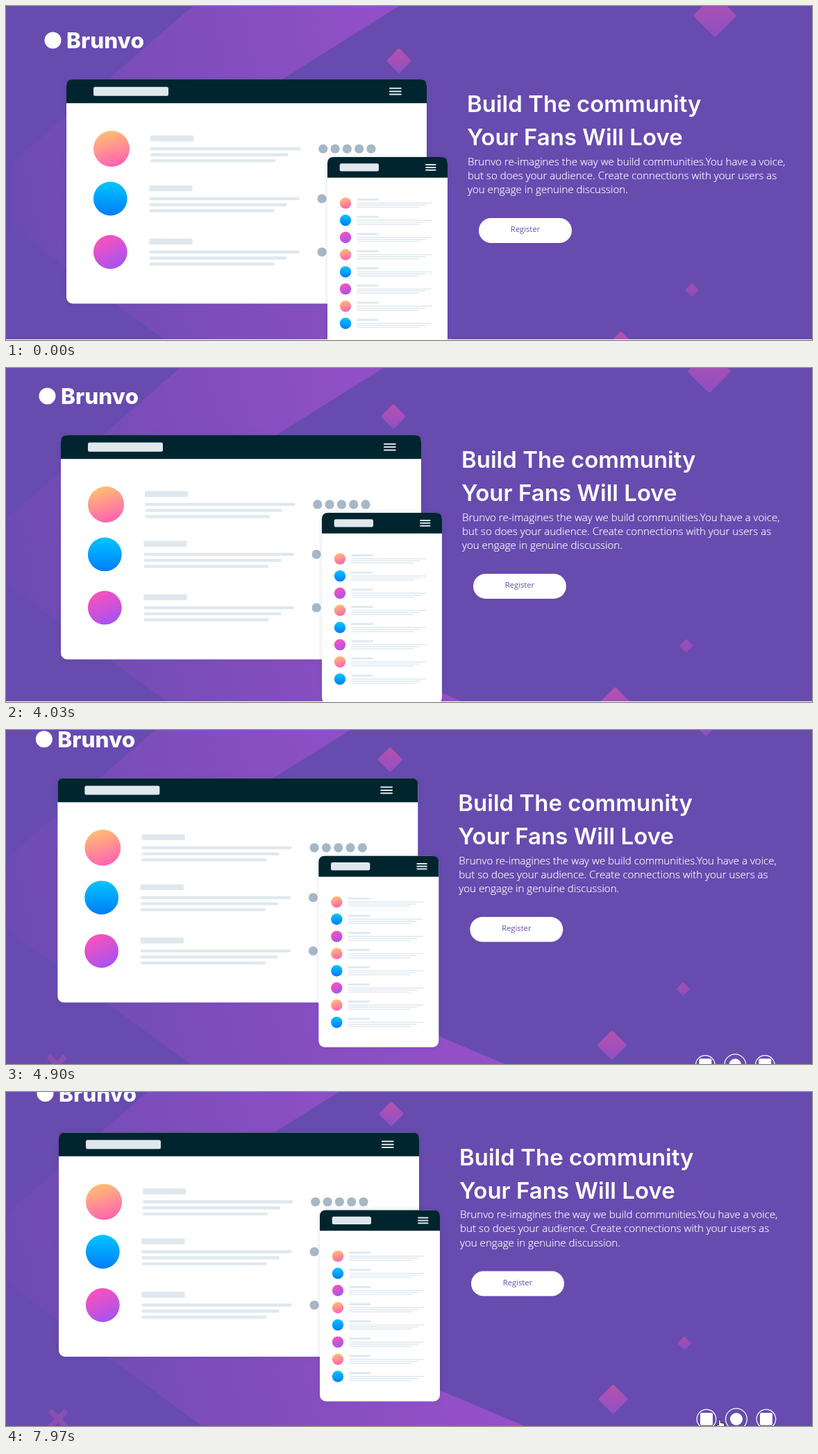
These frames come from a looping animation (1161x482 px, 8 s). An HTML page:

```html
<!DOCTYPE html>
<html lang="en">
<head>
<meta charset="utf-8">
<title>Brunvo</title>
<style>
  html, body { margin: 0; width: 100%; height: 100%; overflow: hidden; background: #674baf; }
  svg { display: block; width: 100%; height: 100%; }
  .brand, .title { font-family: Inter, "Open Sans", sans-serif; font-optical-sizing: none; fill: #fff; }
  .brand { font-size: 31.5px; font-weight: 800; }
  .title { font-size: 33px; font-weight: 640; }
  .copy { font: 300 15.1px "Open Sans", sans-serif; fill: #fff; stroke: #fff; stroke-width: .2; }
  .label { font: 400 11.2px "Open Sans", sans-serif; text-anchor: middle; }
  .card { filter: drop-shadow(0 0 3px rgba(40, 60, 110, .16)); }
</style>
</head>
<body>
<svg viewBox="0 0 1161 482" preserveAspectRatio="none">
  <defs>
    <linearGradient id="band" gradientUnits="userSpaceOnUse" x1="-46" y1="300" x2="684" y2="132">
      <stop stop-color="#684baf"/><stop offset="1" stop-color="#9a50cc"/>
    </linearGradient>
    <linearGradient id="gem" x1="0" y1="0" x2="1" y2="1">
      <stop stop-color="#c152ab"/><stop offset="1" stop-color="#9450c8"/>
    </linearGradient>
    <linearGradient id="peach" x1=".35" y1="0" x2=".65" y2="1">
      <stop stop-color="#ffc070"/><stop offset="1" stop-color="#ff60b4"/>
    </linearGradient>
    <linearGradient id="sky" x1="0" y1="0" x2="0" y2="1">
      <stop stop-color="#00c6ff"/><stop offset="1" stop-color="#007cfa"/>
    </linearGradient>
    <linearGradient id="orchid" x1=".25" y1="0" x2=".75" y2="1">
      <stop stop-color="#ff52b8"/><stop offset="1" stop-color="#a153f4"/>
    </linearGradient>
  </defs>
  <g id="page">
    <path fill="url(#band)" d="M10 225L269 0H566L300 167 400 378 636 478 759 530H294L158 430 10 321Z"/>
    <g id="gems"></g>
    <path d="M74 507l24 24m0-24l-24 24" stroke="#b052b4" stroke-opacity=".5" stroke-width="8"/>
    <circle cx="67.5" cy="49.5" r="12" fill="#fff"/>
    <text class="brand" x="87" y="61">Brunvo</text>
    <g id="desktop" class="card"></g>
    <g id="phone" class="card"></g>
    <text class="title" x="664" y="153">Build The community</text>
    <text class="title" x="664" y="201">Your Fans Will Love</text>
    <text class="copy" x="665" y="229.7">Brunvo re-imagines the way we build communities.You have a voice,</text>
    <text class="copy" x="665" y="249.9">but so does your audience. Create connections with your users as</text>
    <text class="copy" x="665" y="270.2">you engage in genuine discussion.</text>
    <rect id="button" x="681" y="306" width="134" height="36" rx="18"/>
    <text id="label" class="label" x="748" y="326">Register</text>
    <g id="social"></g>
  </g>
  <rect id="edge" y="481" width="1161" height="1" fill="#fff"/>
  <g id="cursor" stroke="#111" stroke-width=".8" stroke-linejoin="round" fill="#fff">
    <path id="arrow" d="M0 0V11.5L2.7 9 4.5 13 6.3 12.2 4.5 8.3H8Z"/>
    <path id="hand" d="M-1.3 .6Q0 -.8 1.2 .6V4.2L5.5 5.2Q7 5.6 6.8 7.5L5.8 13H-.6L-3.8 8.4Q-4.2 6.6-2.6 7L-1.3 8.3Z"/>
  </g>
</svg>
<script>
const LOOP = 8000, HOVER = '#e882e8', PALE = '#e0e8ee', DARK = '#00252e', VIOLET = '#674baf';
const avatars = ['peach', 'sky', 'orchid'];
const $ = id => document.getElementById(id);
const clamp = k => Math.min(1, Math.max(0, k));

function add(parent, tag, attrs) {
  const el = document.createElementNS('http://www.w3.org/2000/svg', tag);
  for (const k in attrs) el.setAttribute(k, attrs[k]);
  parent.append(el);
  return el;
}
const rect = (g, x, y, width, height, fill, rx = 0) => add(g, 'rect', { x, y, width, height, fill, rx });
const dot = (g, cx, cy, r, fill) => add(g, 'circle', { cx, cy, r, fill });

function gem(x, y, r, opacity) {
  const s = r * Math.SQRT2;
  const el = rect($('gems'), -s / 2, -s / 2, s, s, 'url(#gem)', r / 10);
  el.setAttribute('transform', `translate(${x} ${y}) rotate(45)`);
  el.setAttribute('opacity', opacity);
}

// White window with a dark header, a search bar and a menu icon
function card(g, x, y, w, h, head, pad, bar) {
  const mid = y + head / 2, menu = head * .52;
  rect(g, x, y, w, h, '#fff', 9);
  add(g, 'path', {
    d: `M${x} ${y + head}v${9 - head}q0-9 9-9h${w - 18}q9 0 9 9v${head - 9}Z`, fill: DARK
  });
  rect(g, x + pad, mid - head * .19, bar, head * .38, PALE, 2.5);
  for (let i = -1; i < 2; i++) rect(g, x + w - pad * .93 - menu, mid - 1 + i * head * .127, menu, 2, PALE, 1);
}

// Heading bar plus three text lines, each shorter than the last
function post(g, x, y, w, h) {
  rect(g, x, y - h * 4.5, w * .288, h * 2, PALE, h / 3);
  for (let i = 0; i < 3; i++) rect(g, x, y + h * (i * 2.03 - .5), w * (1 - i / 12), h, PALE, h / 2);
}

function build() {
  gem(1021, 14, 31.5, .85);
  gem(566, 79, 18.3, .9);
  gem(988, 410, 10, .7);
  gem(885.5, 491, 21.7, .9);

  const desk = $('desktop');
  card(desk, 87, 106, 519, 323.5, 34.3, 39, 108);
  [206, 278, 355].forEach((y, i) => {
    const x = i ? 206.3 : 208;
    dot(desk, x - 56, y, i ? 24.4 : 26, `url(#${avatars[i]})`);
    post(desk, x, y, 216.5, 4.3);
    for (let k = 0; k < 5; k++) dot(desk, x + 248.8 + k * 17.3, y, 6.6, '#a6b7c8');
  });

  const phone = $('phone');
  card(phone, 463, 218, 173, 276, 29.8, 17.7, 56.3);
  for (let i = 0; i < 8; i++) {
    const y = 284.4 + i * 24.8;
    dot(phone, 489, y, 8.2, `url(#${avatars[i % 3]})`);
    post(phone, 505.3, y, 108.5, 1.45);
  }

  for (let i = 0; i < 3; i++) {
    const x = 1020 + i * 43, round = i === 1;
    const g = add($('social'), 'g', {});
    add(g, 'circle', { cx: x, cy: 519.5, r: round ? 15.4 : 13.8, fill: 'none', 'stroke-width': 1.2 });
    rect(g, x - 9, 510.5, 18, 18, 'inherit', round ? 9 : 2).setAttribute('stroke', 'none');
  }
}

// Each leg runs from the end of the one before; bend bulges it sideways
const visit = {
  x: 1086, y: 470, legs: [
    { from: 310, to: 1060, x: 741, y: 328, bend: 0 },
    { from: 1130, to: 1930, x: 1021, y: 208, bend: .1 },
    { from: 1950, to: 2400, x: 969, y: 166, bend: 1.05 },
    { from: 2730, to: 3340, x: 784, y: -15, bend: -.2 }
  ]
};
const revisit = {
  x: 802, y: 59, legs: [
    { from: 6160, to: 6690, x: 919, y: 395, bend: 0 },
    { from: 7030, to: 7970, x: 1028, y: 473, bend: 0 }
  ]
};

function follow({ x, y, legs }, t) {
  for (const leg of legs) {
    if (t < leg.from) break;
    const k = clamp((t - leg.from) / (leg.to - leg.from));
    const dx = leg.x - x, dy = leg.y - y, bulge = leg.bend * 4 * k * (1 - k);
    x += dx * k - dy * bulge;
    y += dy * k + dx * bulge;
  }
  return [x, y];
}

// The page jumps a little, then pans up with a slight sideways drift
function pan(t) {
  if (t < 4030) return [0, 0];
  const k = clamp((t - 4030) / 1330);
  return [-8 - 3 * k - 12 * k * (1 - k), -9 - 38.5 * (1 - (1 - k) ** 1.15)];
}

const show = (el, on) => el.setAttribute('visibility', on ? 'visible' : 'hidden');

function draw(t) {
  const [sx, sy] = pan(t);
  $('page').setAttribute('transform', `translate(${sx} ${sy})`);
  show($('edge'), t < 4100);

  const visible = t >= 310 && t < 3340 || t >= 6160;
  const [x, y] = follow(t < 5000 ? visit : revisit, t);
  const px = x - sx, py = y - sy;
  const onButton = visible && px > 681 && px < 815 && py > 306 && py < 342;
  const onIcon = visible && Math.hypot(px - 1020, py - 519.5) < 14;
  const pointing = onButton || py > 505;

  $('cursor').setAttribute('transform', `translate(${x} ${y})`);
  show($('arrow'), visible && !pointing);
  show($('hand'), visible && pointing);
  $('button').setAttribute('fill', onButton ? HOVER : '#fff');
  $('label').setAttribute('fill', onButton ? '#fff' : VIOLET);
  [...$('social').children].forEach((icon, i) => {
    const color = onIcon && i === 0 ? HOVER : '#fff';
    icon.setAttribute('fill', color);
    icon.setAttribute('stroke', color);
  });
}

build();
const start = performance.now();
function tick() {
  draw((performance.now() - start) % LOOP);
  requestAnimationFrame(tick);
}
tick();
</script>
</body>
</html>
```
